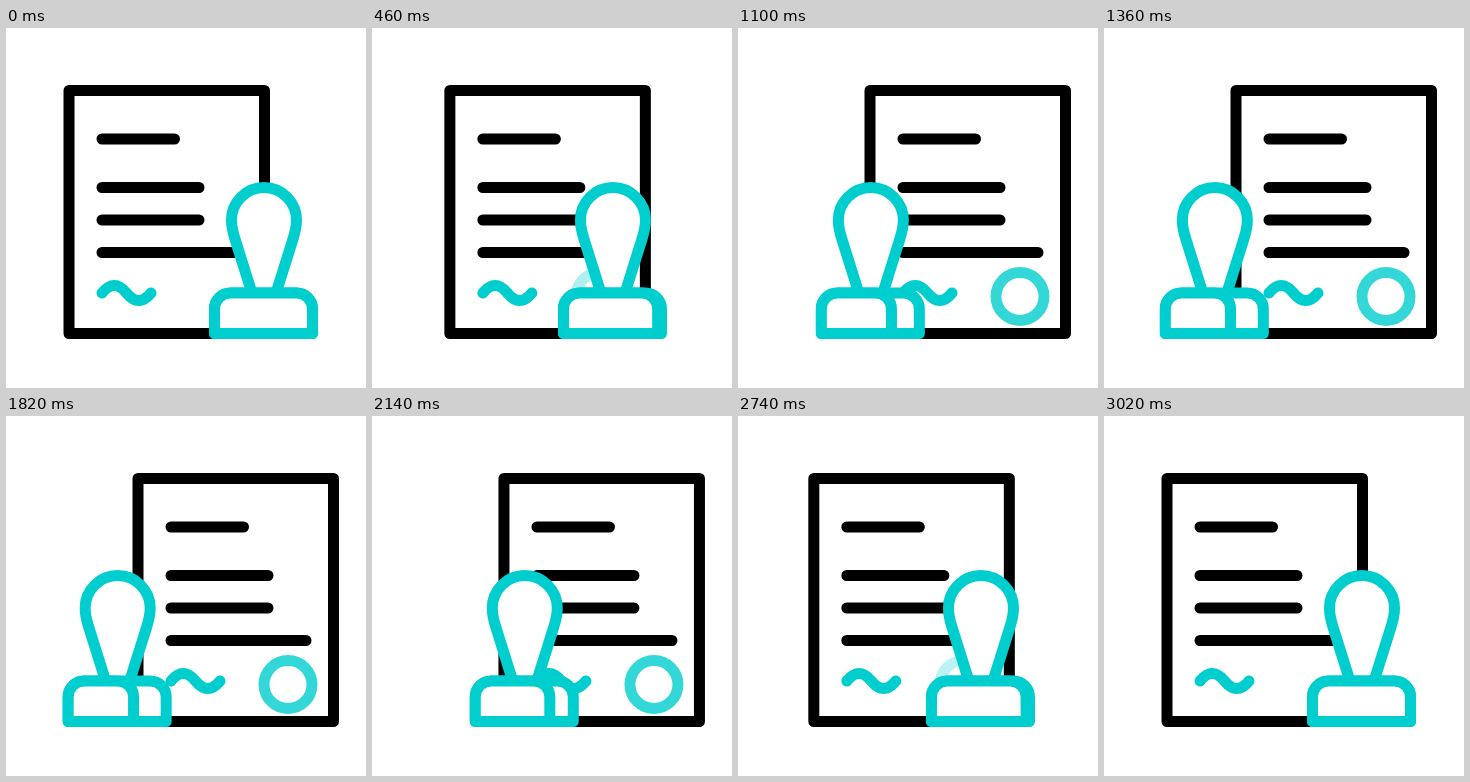
Write an HTML page that moves like this. It is 360 by 360 pixels and loops after 3220 ms.

```html
<!DOCTYPE html>
<html lang="en">
<head>
<meta charset="utf-8">
<title>Document and stamp</title>
<style>
  html, body { margin: 0; width: 100%; height: 100%; overflow: hidden; background: #fff; }
  svg { display: block; width: 100%; height: 100%; }
  path, circle { fill: none; stroke: #000; stroke-width: 11; stroke-linecap: round; stroke-linejoin: round; }
  .teal { stroke: #00cece; }
  #stamp path { fill: #fff; }
</style>
</head>
<body>
<svg viewBox="0 0 360 360">
  <g id="sheet">
    <path d="M63 62.5H258.5V305.5H63Z"/>
    <path d="M96 111H168.5M96 159.5H193M96 192H193M96 224.5H231"/>
    <path class="teal" d="M96 265q12.2-15 24.5 0t24.5 0"/>
    <circle id="seal" class="teal" cx="213" cy="268.5" r="24"/>
  </g>
  <g id="stamp">
    <path class="teal" d="M245 262L229 211Q225.5 200 225.5 192a32.5 32.5 0 0 1 65 0Q290.5 200 287 211L271 262"/>
    <path id="side" class="teal"/>
    <path id="front" class="teal"/>
  </g>
</svg>
<script>
const LOOP = 3220, STAMP_TRAVEL = -148, SHEET_TRAVEL = 69, DEPTH = 33;
const el = id => document.getElementById(id);
const sheet = el('sheet'), seal = el('seal'), stamp = el('stamp'), front = el('front');

function bezier(x1, y1, x2, y2) {
  const at = (s, a, b) => 3 * (1 - s) * s * ((1 - s) * a + s * b) + s ** 3;
  return t => {
    if (t <= 0) return 0;
    if (t >= 1) return 1;
    let lo = 0, hi = 1;
    for (let i = 0; i < 24; i++) {
      const mid = (lo + hi) / 2;
      if (at(mid, x1, x2) < t) lo = mid; else hi = mid;
    }
    return at(lo, y1, y2);
  };
}

const easeOpen = bezier(.35, 0, .63, 1);
const easeClose = bezier(.32, .2, .65, 1);

// 0 = closed, 1 = open
const openness = (t, openStart, openEnd, closeStart, closeEnd) =>
  easeOpen((t - openStart) / (openEnd - openStart)) -
  easeClose((t - closeStart) / (closeEnd - closeStart));

const base = right =>
  `M208.5 305.5V281a16 16 0 0 1 16-16H${right - 16}a16 16 0 0 1 16 16V305.5Z`;

const shift = (node, x) => node.setAttribute('transform', `translate(${x})`);

function draw(now) {
  const t = now % LOOP;
  const stampPos = openness(t, 200, 1420, 1800, 3020);
  const sheetPos = openness(t, 200, 1070, 2140, 3020);
  shift(stamp, STAMP_TRAVEL * stampPos);
  shift(sheet, SHEET_TRAVEL * sheetPos);
  front.setAttribute('d', base(306.5 - DEPTH * stampPos));
  seal.setAttribute('opacity', .8 * Math.min(1, 1.8 * sheetPos));
  requestAnimationFrame(draw);
}

el('side').setAttribute('d', base(306.5));
draw(performance.now());
</script>
</body>
</html>
```
